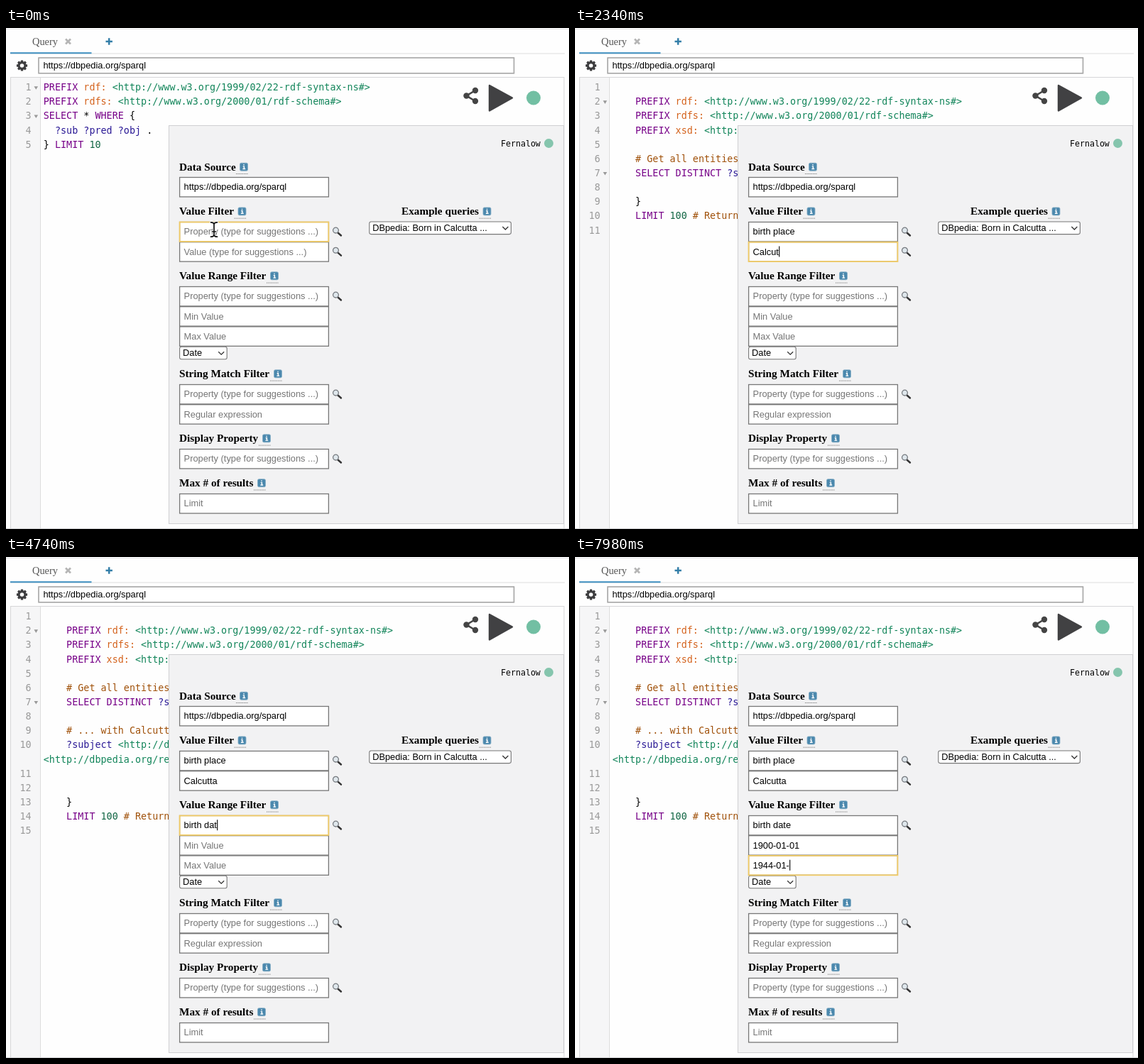
Write an HTML page that moves like this. It is 793 px wide and 706 px high and loops after 8000 ms.

```html
<!DOCTYPE html>
<html lang="en">
<head>
<meta charset="utf-8">
<title>Query builder</title>
<style>
html, body { margin: 0; width: 100%; height: 100%; overflow: hidden; background: #fff; }
svg { display: block; width: 100vw; height: 100vh; }
text { white-space: pre; }
.code { font: 13.42px "DejaVu Sans Mono", monospace; }
.form { font: 12.82px "Liberation Sans", sans-serif; }
.head { font: bold 15.25px "Liberation Serif", serif; }
.num { fill: #999; text-anchor: end; }
.kw { fill: #708; }
.pre { fill: #d4621c; }
.iri { fill: #12855a; }
.var { fill: #2b1a96; }
.lit { fill: #164; }
.rem { fill: #a0510a; }
</style>
</head>
<body>
<svg id="stage" viewBox="0 0 793 706" preserveAspectRatio="none"></svg>
<script>
const LOOP = 8000, ROW = 20.13, LEFT = 244.6, WIDTH = 209.8;
const HINT = 'Property (type for suggestions ...)';
const stage = document.getElementById('stage');
const esc = s => s.replace(/&/g, '&amp;').replace(/</g, '&lt;');
const text = (cls, x, y, s, extra = '') => `<text class="${cls}" x="${x}" y="${y}" ${extra}>${esc(s)}</text>`;
const box = (x, y, w, h, extra) => `<rect x="${x}" y="${y}" width="${w}" height="${h}" ${extra}/>`;
const line = (d, extra) => `<path d="${d}" fill="none" ${extra}/>`;

// Code listings: rows starting with "~" continue the previous line
const header = ['', '    PREFIX rdf: <http://www.w3.org/1999/02/22-rdf-syntax-ns#>',
  '    PREFIX rdfs: <http://www.w3.org/2000/01/rdf-schema#>',
  '    PREFIX xsd: <http://www.w3.org/2001/XMLSchema#>', '',
  '    # Get all entities', '    SELECT DISTINCT ?subject WHERE {', ''];
const footer = ['    }', '    LIMIT 100 # Return 100 results', ''];
const listings = [
  { from: 0, folds: [1, 3], rows: [header[1].trim(), header[2].trim(), 'SELECT * WHERE {', '  ?sub ?pred ?obj .', '} LIMIT 10'] },
  { from: 1500, folds: [2, 7], rows: [...header, ...footer] },
  { from: 3200, folds: [2, 7], rows: [...header, '    # ... with Calcutta as birth place',
    '    ?subject <http://dbpedia.org/ontology/birthPlace>', '~<http://dbpedia.org/resource/Calcutta> .', '', '', ...footer] }
];

function paint(row) {
  const rules = /(# .*)|(<[^>]*>)|(\b[A-Z]{3,}\b)|(\b\w+:)|(\?\w+)|(\b\d+\b)/g;
  const kinds = ['rem', 'iri', 'kw', 'pre', 'var', 'lit'];
  let out = '', at = 0;
  for (const m of row.matchAll(rules)) {
    const kind = kinds[m.slice(1).findIndex(Boolean)];
    out += esc(row.slice(at, m.index)) + `<tspan class="${kind}">${esc(m[0])}</tspan>`;
    at = m.index + m[0].length;
  }
  return out + esc(row.slice(at));
}

function listing({ rows, folds }) {
  let n = 0, out = '';
  rows.forEach((row, i) => {
    const y = 88.2 + i * ROW, wrapped = row[0] === '~';
    if (!wrapped) out += text('code num', 35.6, y, String(++n));
    if (!wrapped && folds.includes(n)) out += `<path d="M39.5 ${y - 6}h5.6l-2.8 4.6z" fill="#999"/>`;
    out += `<text class="code" x="52.8" y="${y}">${paint(wrapped ? row.slice(1) : row)}</text>`;
  });
  return `<g class="listing">${out}</g>`;
}

// Form fields: top edge, placeholder, and what is typed into them
const fields = [
  { y: 210, value: 'https://dbpedia.org/sparql' },
  { y: 273, hint: HINT, lens: 1, value: 'birth place', focus: -600, start: 150, end: 1000 },
  { y: 301.2, hint: 'Value (type for suggestions ...)', lens: 1, value: 'Calcutta', focus: 1500, start: 1800, end: 2500 },
  { y: 364, hint: HINT, lens: 1, value: 'birth date', focus: 3200, start: 3950, end: 4750 },
  { y: 392.2, hint: 'Min Value', value: '1900-01-01', focus: 5350, start: 5600, end: 6100 },
  { y: 420.4, hint: 'Max Value', value: '1944-01-', focus: 6750, start: 7000, end: 7850 },
  { y: 502, hint: HINT, lens: 1 },
  { y: 530.2, hint: 'Regular expression' },
  { y: 593, hint: HINT, lens: 1 },
  { y: 656, hint: 'Limit' }
];
const typed = fields.filter(f => f.start);
const shown = (f, t) => t < f.start ? 0 :
  Math.min(f.value.length, 1 + Math.floor((t - f.start) / (f.end - f.start) * (f.value.length - 1) + 1e-6));

// Pointer moves: start, end, target
const moves = [[1120, 1420, 303, 314], [2620, 2920, 310, 362], [2970, 3130, 310, 376],
  [4900, 5280, 309, 407], [6350, 6630, 302, 440], [6680, 6740, 302, 436]];

const field = (f, i) => box(LEFT, f.y + .5, WIDTH, 27.4, 'fill="#fff" stroke="#777" stroke-width="1.3"') +
  text('form', 250.6, f.y + 18.3, f.hint || f.value, `id="field${i}" fill="${f.hint ? '#757575' : '#000'}"`) +
  (f.lens ? `<g transform="translate(466 ${f.y + 13.5})">` +
    line('M1.5 2L6 6', 'stroke="#333" stroke-width="2.4" stroke-linecap="round"') +
    '<circle cx="-1.5" cy="-1.4" r="3.9" fill="#dfe7ec" stroke="#777b80" stroke-width="1.3"/></g>' : '');

const heading = (x, y, s, end) => text('head', x, y, s) +
  box(end + 5.5, y - 10.5, 11, 11, 'rx="1.8" fill="#4b88ad" stroke="#86aec6" stroke-width=".8"') +
  line(`M${end + 9.7} ${y - 5.6}h1.7v3.4m-2 0h3.8M${end + 11} ${y - 8.6}v1.5`, 'stroke="#fff" stroke-width="1.4"') +
  line(`M${end} ${y + 4.8}h16.5`, 'stroke="#777" stroke-dasharray="1.2 1"');

const select = (x, y, w, s) => box(x, y, w, 17.6, 'rx="2.5" fill="#fff" stroke="#777" stroke-width="1.1"') +
  text('form', x + 4.4, y + 13.2, s) +
  line(`M${x + w - 12} ${y + 7}l4 4 4-4`, 'stroke="#333" stroke-width="1.3"');

const teeth = Array.from({ length: 8 }, (_, i) =>
  `<rect x="-1.7" y="-7.6" width="3.4" height="4" rx=".6" transform="rotate(${i * 45})"/>`).join('');

stage.innerHTML =
  box(0, 0, 793, 706, 'fill="#fefefe"') +
  line('M0 1.5H793', 'stroke="#e4e4e6"') +
  line('M6 36H787', 'stroke="#ddd"') +
  line('M6 35.2H120.5', 'stroke="#3f8fc0" stroke-width="2"') +
  text('', 37, 24, 'Query', 'font-family="Liberation Serif, serif" font-size="14.4" fill="#555"') +
  line('M84 15.5l7 7m0-7l-7 7', 'stroke="#b5b5b5" stroke-width="2.7"') +
  line('M140.5 19h9.4m-4.7-4.7v9.4', 'stroke="#337ea8" stroke-width="2.5"') +
  `<g transform="translate(22.5 53)" fill="#3d3d3f">${teeth}<circle r="4.4" fill="none" stroke="#3d3d3f" stroke-width="3.2"/></g>` +
  box(46, 42, 669.5, 21.8, 'fill="#fff" stroke="#a5a5a5" stroke-width="1.6"') +
  text('form', 52.4, 57.2, 'https://dbpedia.org/sparql') +
  box(6.5, 69.5, 779.5, 640, 'fill="#fefefe" stroke="#d6d6d8"') +
  box(7, 70, 41, 636, 'fill="#f6f6f7"') +
  line('M48.5 70V706', 'stroke="#ddd"') +
  listings.map(listing).join('') +
  line('M661 88L648.5 95.5L661 103', 'stroke="#444" stroke-width="2.6"') +
  [[661, 88], [648.5, 95.5], [661, 103]].map(([x, y]) => `<circle cx="${x}" cy="${y}" r="4.2" fill="#444"/>`).join('') +
  '<path d="M681 81L713 98.5L681 116.5z" fill="#414143" stroke="#414143" stroke-width="2.4" stroke-linejoin="round"/>' +
  '<circle cx="743" cy="98.5" r="10" fill="#72bfa3"/>' +
  box(229.5, 137.5, 556, 561, 'fill="#f2f2f3" stroke="#cfcfd2"') +
  text('', 697, 167.3, 'Fernalow', 'font-family="DejaVu Sans Mono, monospace" font-size="11.6"') +
  '<circle cx="764.5" cy="162.5" r="6.5" fill="#85c5ad"/>' +
  heading(244, 200.7, 'Data Source', 324) +
  heading(244, 263.4, 'Value Filter', 321.5) +
  heading(244, 354.3, 'Value Range Filter', 367) +
  heading(244, 492.3, 'String Match Filter', 372) +
  heading(244, 583.3, 'Display Property', 356) +
  heading(244, 646.2, 'Max # of results', 349) +
  heading(557, 263.4, 'Example queries', 666.5) +
  fields.map(field).join('') +
  select(244.6, 449.2, 66.6, 'Date') +
  select(511.8, 273, 199.6, 'DBpedia: Born in Calcutta ...') +
  box(LEFT, 0, WIDTH, 27.4, 'id="ring" fill="none" stroke="#f2cc66" stroke-width="1.8"') +
  line('M0 -7.5V7.5', 'id="caret" stroke="#000" stroke-width="1.1"') +
  '<g id="pointer">' + ['#fff" stroke-width="3.6', '#111" stroke-width="1.7'].map(s =>
    line('M-4.5 -10.2Q-.5 -10.2 0 -7.5Q.5 -10.2 4.5 -10.2M0 -7.5V7.5M-4.5 10.2Q-.5 10.2 0 7.5Q.5 10.2 4.5 10.2M-2.6 3H2.6',
      `stroke="${s}" stroke-linecap="round"`)).join('') + '</g>' +
  line('M0 705.5H793', 'stroke="#d0d0d2"');

const pick = id => document.getElementById(id);
const ring = pick('ring'), caret = pick('caret'), pointer = pick('pointer');
const labels = fields.map((f, i) => pick('field' + i));
const groups = [...document.querySelectorAll('.listing')];
const show = (el, on) => el.setAttribute('visibility', on ? 'visible' : 'hidden');

function draw(t) {
  const current = listings.filter(l => t >= l.from).length - 1;
  groups.forEach((g, i) => show(g, i === current));

  for (const f of typed) {
    const label = labels[fields.indexOf(f)], n = shown(f, t);
    label.textContent = n ? f.value.slice(0, n) : f.hint;
    label.setAttribute('fill', n ? '#000' : '#757575');
  }

  const active = typed.filter(f => t >= f.focus).pop();
  const count = shown(active, t);
  const end = count ? labels[fields.indexOf(active)].getComputedTextLength() + .4 : 0;
  const idle = t - (t < active.start ? active.focus : Math.min(t, active.end));
  ring.setAttribute('y', active.y + .5);
  caret.setAttribute('transform', `translate(${251 + end} ${active.y + 13.8})`);
  show(caret, idle % 1000 < 500);

  let x = 293, y = 284, woke = -1;
  for (const [from, to, mx, my] of moves) {
    if (t < from) break;
    const k = Math.min(1, (t - from) / (to - from)), e = k * k * (3 - 2 * k);
    x += (mx - x) * e;
    y += (my - y) * e;
    woke = from;
  }
  // Typing hides the pointer until it moves again
  const keyed = Math.max(-2, ...typed.filter(f => t >= f.start).map(f => f.start));
  show(pointer, woke > keyed);
  pointer.setAttribute('transform', `translate(${x} ${y})`);
}

function tick() {
  draw(performance.now() % LOOP);
  requestAnimationFrame(tick);
}
tick();
</script>
</body>
</html>
```
